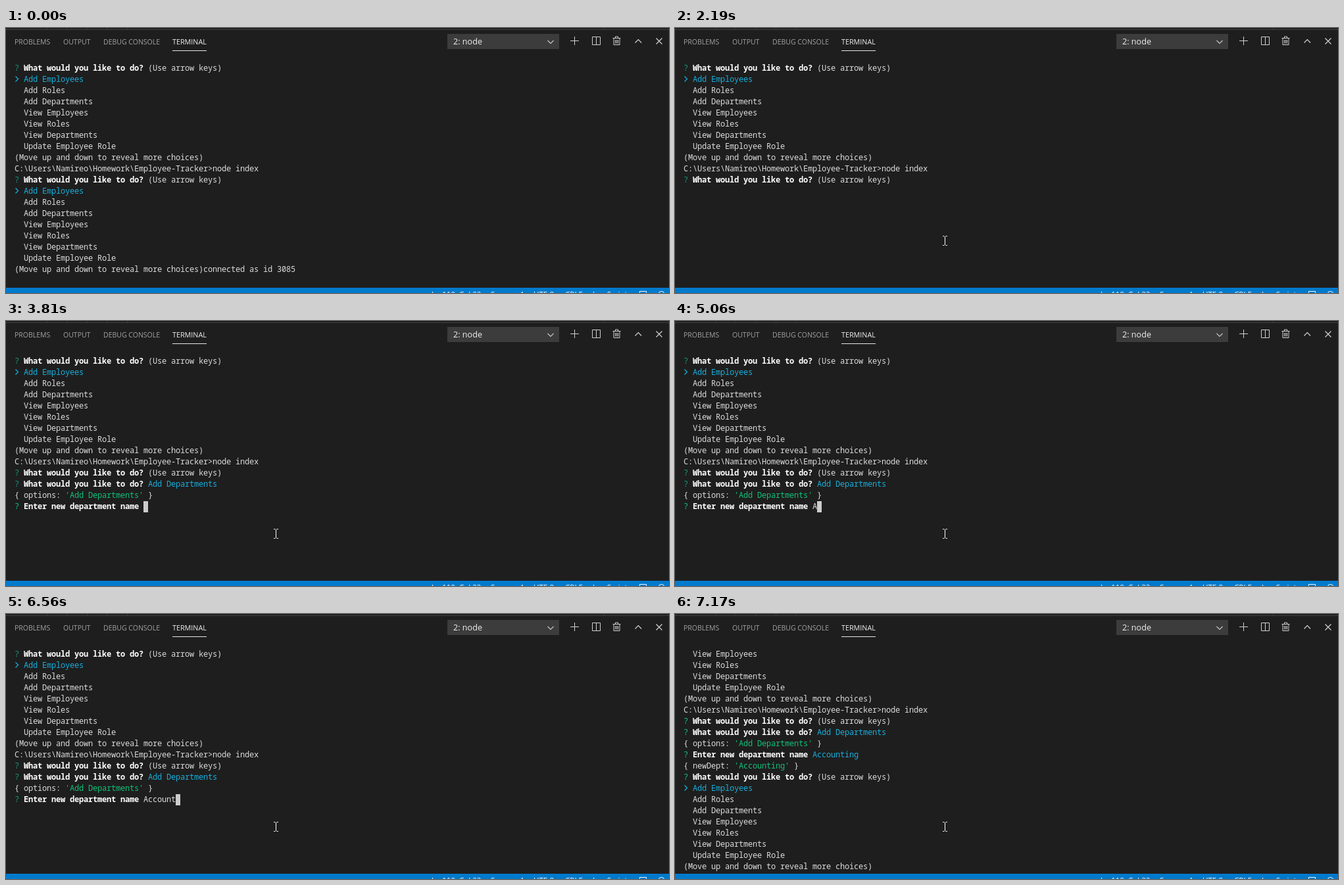
Animation of 1008 by 403 pixels, one loop 8000 ms. Source, as an HTML page:

```html
<!DOCTYPE html>
<html lang="en">
<head>
<meta charset="utf-8">
<title>Terminal session</title>
<style>
  html, body { margin: 0; width: 100%; height: 100%; overflow: hidden; background: #1e1e1e; }
  #stage { position: relative; width: 1008px; height: 403px; overflow: hidden; background: #1e1e1e; }
  #stage > svg { position: absolute; left: 0; top: 0; font-family: "Open Sans", "Noto Sans", sans-serif; }
  pre {
    position: absolute; left: 13px; top: 52px; margin: 0; color: #dcdcdc;
    font: 500 12px/17px "Noto Sans Mono", "DejaVu Sans Mono", monospace;
    letter-spacing: -.2px; font-variant-ligatures: none;
  }
  pre b { color: #fff; }
  pre i { font-style: normal; }
  pre svg { vertical-align: baseline; fill: none; stroke: currentColor; stroke-width: 1.3; }
  .cyan { color: #18aedb; }
  .green { color: #10c27a; }
  .dim { color: #14967a; }
  #cursor { position: absolute; left: 0; top: 274px; width: 7px; height: 17px; background: #ccc; }
</style>
</head>
<body>
<div id="stage">
  <svg width="1008" height="403">
    <path d="M0 2.5H1008" stroke="#414141"/>
    <path d="M62.5 0v2M92.5 0v2M123.5 0v2M153.5 0v2M184.5 0v2M909.5 0v2" stroke="#383838"/>

    <g font-size="10.5" fill="#a2a2a2">
      <text x="13" y="25">PROBLEMS</text>
      <text x="87" y="25">OUTPUT</text>
      <text x="148" y="25">DEBUG CONSOLE</text>
      <text x="253" y="25" font-size="10.75" fill="#f0f0f0">TERMINAL</text>
    </g>
    <path d="M253 34.5H305" stroke="#e7e7e7"/>

    <rect x="671" y="9" width="170" height="23" fill="#3c3c3c"/>
    <text x="680" y="25" font-size="12.6" fill="#f0f0f0">2: node</text>
    <path d="M823.5 19l4.5 4.5 4.5-4.5" fill="none" stroke="#c5c5c5" stroke-width="1.2"/>

    <g fill="none" stroke="#d0d0d0">
      <path d="M858 19.5h13M864.5 13v13"/>
      <path d="M891.5 13.5h12v12h-12zM897.5 13.5v12"/>
      <path d="M922.5 15.5h12M926.5 15v-2h4v2M924 16v9.5h9V16M926.5 18v5.5M928.5 18v5.5M930.5 18v5.5"/>
      <path d="M956.5 22.5l4.8-5 4.8 5M988.5 15.5l9 9M997.5 15.5l-9 9" stroke-width="1.2"/>
    </g>

    <rect y="395" width="1008" height="8" fill="#007acc"/>
    <g font-size="11.6" fill="#fff">
      <text x="647" y="409">Ln 119, Col 22</text>
      <text x="737" y="409">Spaces: 4</text>
      <text x="802" y="409">UTF-8</text>
      <text x="850" y="409">CRLF</text>
      <text x="892" y="409">JavaScript</text>
    </g>
    <path d="M963.5 403v-2.5h10v2.5M992.5 403q.5-2.5 4-2.5t4 2.5" fill="none" stroke="#fff"/>
  </svg>
  <pre id="term"></pre>
  <div id="cursor"></div>
  <svg id="mouse" width="9" height="17">
    <path d="M1 1.5h2.5M5.5 1.5H8M4.5 2v13M1 15.5h2.5M5.5 15.5H8" fill="none" stroke="#fff"/>
  </svg>
</div>
<script>
const LOOP = 8000;
const $ = id => document.getElementById(id);
const term = $('term'), cursor = $('cursor'), mouse = $('mouse');

const tint = (cls, s) => `<i class="${cls}">${s}</i>`;
const ask = (text, mark = 'dim') => `${tint(mark, '?')} <b>${text}</b> `;
const QUESTION = 'What would you like to do?';
const HINT = '(Use arrow keys)';
const ARROW = '<svg width="7.2" height="9" style="margin-right:-.2px"><path d="M1.5 .5l4 4-4 4"/></svg>';
const OPTIONS = ['Add Employees', 'Add Roles', 'Add Departments', 'View Employees',
  'View Roles', 'View Departments', 'Update Employee Role'];

const menu = picked => [
  ...OPTIONS.map((s, i) => i === picked ? tint('cyan', `${ARROW} ${s}`) : '  ' + s),
  '(Move up and down to reveal more choices)'
];
const record = (key, value) => `{ ${key}: ${tint('green', `'${value}'`)} }`;

const COMMAND = 'C:\\Users\\Namireo\\Homework\\Employee-Tracker&gt;node index';
const history = [ask(QUESTION) + HINT, ...menu(0), COMMAND, ask(QUESTION) + HINT];
const answer = mark => ask(QUESTION, mark) + tint('cyan', 'Add Departments');

// Time at which each letter of the department name shows up
const WORD = 'Accounting';
const KEYS = [5060, 5440, 5600, 5680, 5840, 6380, 6560, 6710, 6790, 6940];
const typed = t => KEYS.filter(k => k <= t).length;

function screen(t) {
  if (t < 2190) {
    const lines = [...history, ...menu(0)];
    lines[lines.length - 1] += 'connected as id 3085';
    return lines;
  }
  if (t < 2260) return history;
  if (t < 3810) return [...history, ask(QUESTION), ...menu(t < 2960 ? 1 : 2)];
  if (t < 7170) return [
    ...history, answer('dim'), record('options', 'Add Departments'),
    ask('Enter new department name', t < 5600 ? 'green' : 'dim') + WORD.slice(0, typed(t))
  ];
  return [
    ...menu(0).slice(3), COMMAND,
    ask(QUESTION, 'green') + HINT, answer('green'), record('options', 'Add Departments'),
    ask('Enter new department name', 'green') + tint('cyan', WORD), record('newDept', WORD),
    ask(QUESTION, 'green') + HINT, ...menu(0)
  ];
}

// Pointer positions, one every 80 ms from the given start
const MOVES = [
  { start: 220, path: [[661, 376], [588, 349], [497, 316], [396, 282], [300, 256],
    [226, 241], [178, 236], [158, 245], [168, 262], [187, 279]] },
  { start: 1090, path: [[208, 285], [262, 298], [330, 311], [384, 320], [410, 323]] }
];

function pointer(t) {
  const move = MOVES.filter(m => m.start <= t).pop();
  if (!move) return null;
  const step = Math.floor((t - move.start) / 80);
  return move.path[Math.min(step, move.path.length - 1)];
}

let shown = '';
function draw() {
  const t = performance.now() % LOOP;

  const html = screen(t).join('\n');
  if (html !== shown) term.innerHTML = shown = html;

  cursor.style.visibility = t >= 3810 && t < 7170 ? 'visible' : 'hidden';
  cursor.style.transform = `translateX(${209 + 7 * typed(t)}px)`;

  const at = pointer(t);
  mouse.style.visibility = at ? 'visible' : 'hidden';
  if (at) mouse.style.transform = `translate(${at[0] - 4}px, ${at[1] - 8}px)`;

  requestAnimationFrame(draw);
}
draw();
</script>
</body>
</html>
```
